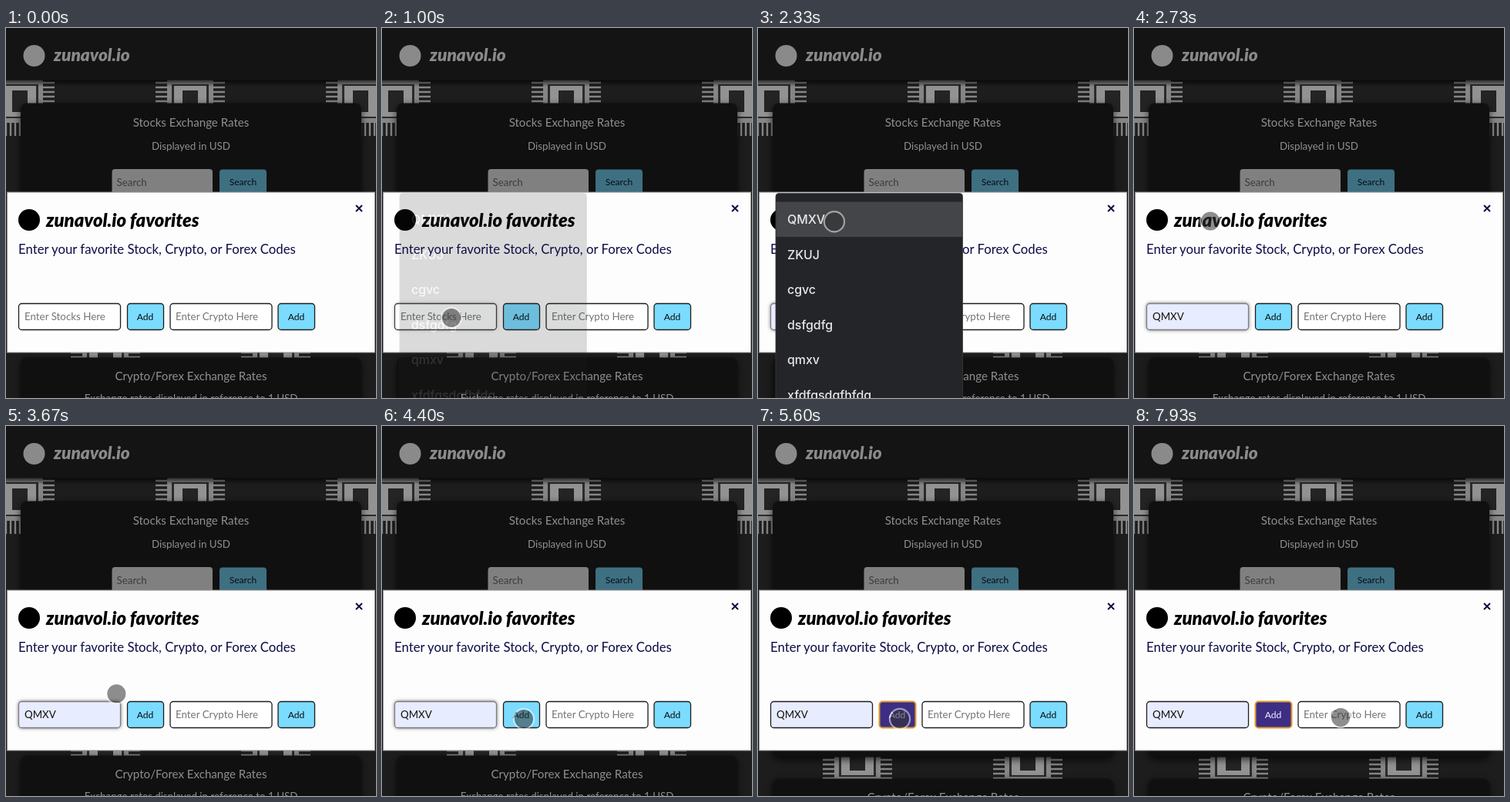
Animation, 480 px wide and 480 px high, one loop 8 s. Source, as an HTML page:

```html
<!DOCTYPE html>
<html lang="en">
<head>
<meta charset="utf-8">
<title>Favorites dialog</title>
<style>
html, body { margin: 0; width: 100%; height: 100%; overflow: hidden; background: #1c1c1c; }
svg { display: block; width: 100vw; height: 100vh; }
text { font-family: Lato, sans-serif; white-space: pre; }
.mid { text-anchor: middle; }
.h { font-size: 15.1px; fill: #8f8f8f; }
.p { font-size: 13.35px; fill: #8f8f8f; }
.hint { font-size: 13.35px; fill: #757575; }
.btn { font-size: 12.1px; fill: #0a0a14; }
.brand { font-weight: 900; font-style: italic; }
.menu text { font-family: Inter, sans-serif; font-size: 15.9px; font-weight: 500; fill: #e8e8ea; }
.panel { fill: #101010; filter: drop-shadow(0 3px 5px #000b); }
.box { stroke: #1c1c1c; stroke-width: 1.3; }
</style>
</head>
<body>
<svg viewBox="0 0 480 480" preserveAspectRatio="none">
  <defs>
    <g id="chip">
      <path id="pins" stroke="#858585" stroke-width="2.4" fill="none"/>
      <rect x="-30" y="-28" width="60" height="56" rx="2" fill="#858585"/>
      <rect x="-24" y="-22" width="48" height="44" fill="#2b2b2b"/>
      <rect x="-21" y="-20" width="42" height="40" fill="#929292"/>
      <rect x="-10" y="-14" width="20" height="28" fill="#242424"/>
    </g>
    <linearGradient id="shade" x2="0" y2="1">
      <stop stop-color="#000" stop-opacity=".7"/>
      <stop offset="1" stop-color="#000" stop-opacity="0"/>
    </linearGradient>
  </defs>

  <rect width="480" height="480" fill="#1d1d1d"/>
  <g id="chips"></g>
  <rect y="67" width="480" height="9" fill="url(#shade)"/>
  <rect width="480" height="67.5" fill="#141414"/>
  <circle cx="36.5" cy="36" r="14" fill="#8a8a8a"/>
  <text class="brand" x="62" y="43" font-size="22.6" fill="#8a8a8a">zunavol.io</text>

  <rect id="stocks" class="panel" x="19" y="97.5" width="442" height="302" rx="8"/>
  <text class="h mid" x="240" y="128">Stocks Exchange Rates</text>
  <text class="p mid" x="240" y="157.5">Displayed in USD</text>
  <rect x="137.5" y="183" width="130.5" height="35" rx="4" fill="#808080"/>
  <text class="hint" x="143.5" y="204.5" style="fill:#3c3c3c">Search</text>
  <rect x="277" y="183.5" width="61" height="34" rx="4" fill="#3e7082"/>
  <text class="btn mid" x="307.5" y="204">Search</text>
  <g id="crypto">
    <rect class="panel" x="19" y="427.5" width="442" height="90" rx="8"/>
    <text class="h mid" x="240" y="457">Crypto/Forex Exchange Rates</text>
    <text class="p mid" x="240" y="484.5">Exchange rates displayed in reference to 1 USD</text>
  </g>

  <rect x="1.5" y="213" width="477" height="208" fill="#fdfdfd" stroke="#8f888c"/>
  <circle cx="30" cy="249" r="14" fill="#000"/>
  <text class="brand" x="52" y="258" font-size="23.8">zunavol.io favorites</text>
  <path d="M454 230l8 8m0-8l-8 8" stroke="#0c0c40" stroke-width="1.9"/>
  <text x="16" y="293" font-size="16.75" fill="#0c0c48">Enter your favorite Stock, Crypto, or Forex Codes</text>

  <rect id="field" class="box" x="16.5" y="357.5" width="132" height="34" rx="4"/>
  <text id="entry" class="hint" x="24" y="378.5"></text>
  <rect id="add" class="box" x="157.5" y="357.5" width="47" height="34" rx="4"/>
  <text id="addText" class="btn mid" x="180.5" y="379">Add</text>
  <rect class="box" x="213" y="357.5" width="132" height="34" rx="4" fill="#fff"/>
  <text class="hint" x="220" y="378.5">Enter Crypto Here</text>
  <rect class="box" x="353" y="357.5" width="47.5" height="34" rx="4" fill="#7bdcff"/>
  <text class="btn mid" x="376.5" y="379">Add</text>

  <g id="menu" class="menu">
    <rect x="23" y="214.5" width="242.5" height="290" rx="4" fill="#242529" stroke="#3a3b3f" stroke-width=".8"/>
    <rect id="hover" x="23.4" width="241.7" height="45.5" fill="#444548"/>
  </g>
  <g id="cursor">
    <circle r="12.2" fill="#323232" fill-opacity=".55"/>
    <circle r="13.1" fill="none" stroke="#fff" stroke-opacity=".5" stroke-width="2.2"/>
  </g>
</svg>
<script>
const LOOP = 8000, ROW = 45.5, TOP = 225.5;
const MENU = [990, 2560], PICK = 2500, GROW = 5000;
const CODES = ['QMXV', 'ZKUJ', 'cgvc', 'dsfgdfg', 'qmxv', 'xfdfgsdgfhfdg'];
// time, x, y, ease-out power
const PATH = [
  [70, 300, 330, 1], [800, 90, 376, 2.5],
  [2110, 90, 376, 1], [2350, 99, 250.5, 2],
  [3530, 99, 250.5, 1], [3670, 143, 347, 1], [3900, 184, 380, 2],
  [6310, 184, 380, 1], [6600, 268, 378, 2]
];

const $ = id => document.getElementById(id);
const set = (id, attrs) => {
  for (const k in attrs) $(id).setAttribute(k, attrs[k]);
};
const ramp = (t, a, b) => Math.min(1, Math.max(0, (t - a) / (b - a)));
const mix = (a, b, k) => a + (b - a) * k;
const blend = (a, b, k) => `rgb(${a.map((v, i) => Math.round(mix(v, b[i], k)))})`;

function make(tag, parent, attrs, text = '') {
  const el = document.createElementNS('http://www.w3.org/2000/svg', tag);
  for (const k in attrs) el.setAttribute(k, attrs[k]);
  el.textContent = text;
  parent.append(el);
}

function build() {
  let d = '';
  for (let p = -24; p <= 24; p += 6) {
    d += `M-45 ${p}H-30M30 ${p}H45M${p} -45V-28M${p} 28V45`;
  }
  set('pins', { d });
  [[18, 95], [239, 95], [460, 95], [129, 433], [350, 433]].forEach(([x, y]) =>
    make('use', $('chips'), { href: '#chip', x, y }));
  CODES.forEach((code, i) =>
    make('text', $('menu'), { x: 38, y: 254 + i * ROW }, code));
}

function cursorAt(t) {
  const i = PATH.findIndex(k => k[0] > t);
  if (i === 0) return PATH[0].slice(1, 3);
  if (i < 0) return PATH[PATH.length - 1].slice(1, 3);
  const a = PATH[i - 1], b = PATH[i];
  const k = 1 - Math.pow(1 - ramp(t, a[0], b[0]), b[3]);
  return [mix(a[1], b[1], k), mix(a[2], b[2], k)];
}

function draw(t) {
  const [x, y] = cursorAt(t);
  set('cursor', { transform: `translate(${x} ${y})`, opacity: ramp(t, 70, 200) });

  const row = Math.floor((y - TOP) / ROW);
  set('menu', { opacity: ramp(t, MENU[0], MENU[0] + 70) * (1 - ramp(t, MENU[1], MENU[1] + 120)) });
  set('hover', { y: TOP + row * ROW, opacity: t > 2130 ? 1 : 0 });

  const filled = t >= PICK;
  const focus = ramp(t, 930, 1130) * (1 - ramp(t, 4620, 4820));
  set('field', {
    fill: t > 2300 ? '#e8ecff' : '#fff',
    style: `stroke:${blend([28, 28, 28], [125, 125, 125], focus)};` +
      `filter:drop-shadow(0 0 2px rgba(0,0,0,${focus * 0.5}))`
  });
  $('entry').textContent = filled ? CODES[0] : 'Enter Stocks Here';
  $('entry').style.fill = filled ? '#111' : '#757575';

  const press = ramp(t, 4600, 4900);
  set('add', {
    fill: blend([123, 220, 255], [61, 46, 132], press),
    style: `stroke:${blend([28, 28, 28], [224, 152, 44], press)};stroke-width:${mix(1.3, 2, press)}`
  });
  $('addText').style.fill = blend([10, 10, 20], [240, 240, 250], press);

  const shift = t >= GROW ? 30 : 0;
  set('stocks', { height: 302 + shift });
  set('crypto', { transform: `translate(0 ${shift})` });
}

build();
const start = performance.now();
function tick() {
  draw((performance.now() - start) % LOOP);
  requestAnimationFrame(tick);
}
tick();
</script>
</body>
</html>
```
